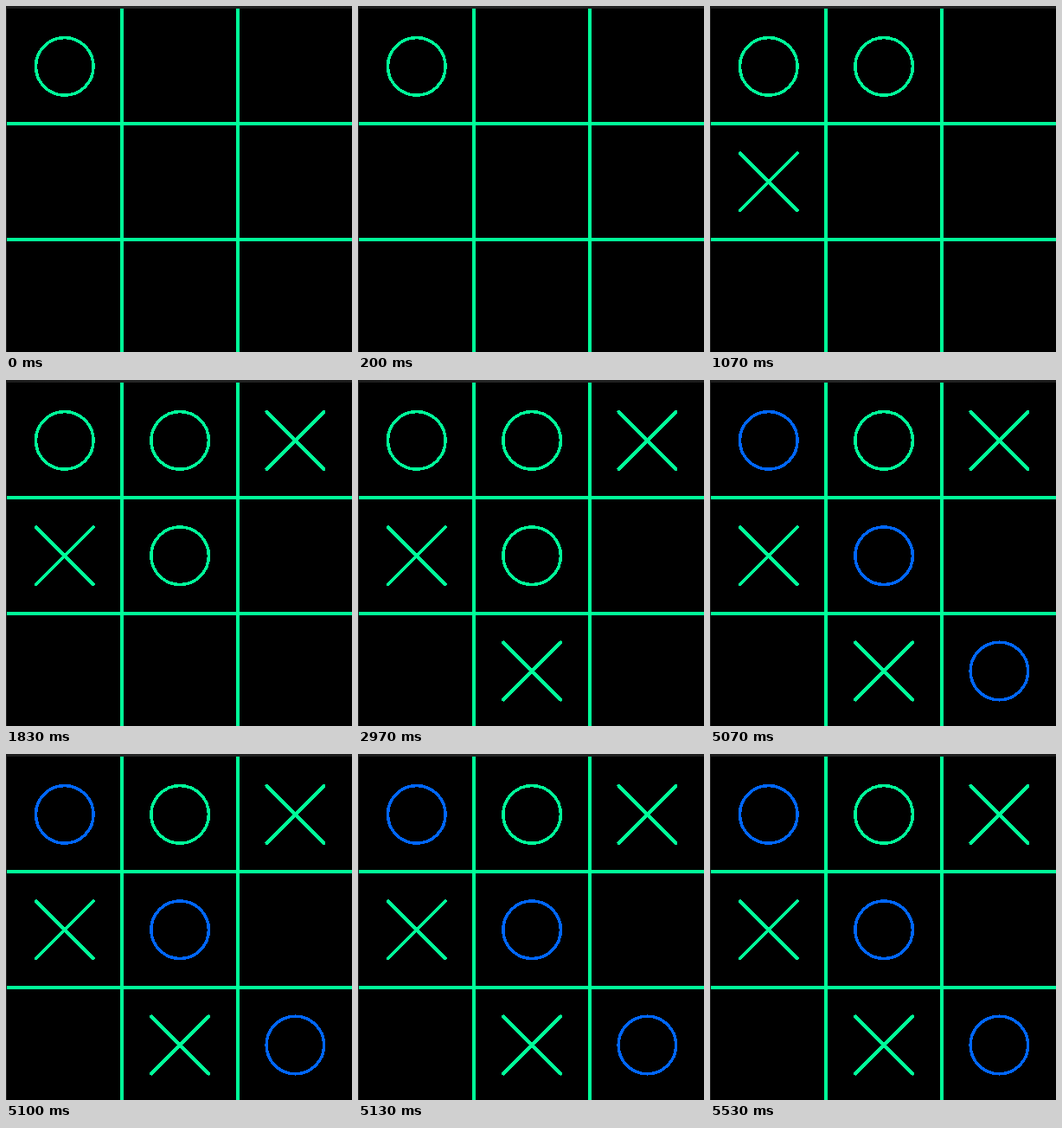
Animation, 400 px wide and 400 px high, one loop 5.61 s. Source, as an HTML page:

```html
<!DOCTYPE html>
<html lang="en">
<head>
<meta charset="utf-8">
<title>Tic-tac-toe</title>
<style>
  html, body { margin: 0; width: 100%; height: 100%; overflow: hidden; background: #000; }
  svg { display: block; width: 100vw; height: 100vh; }
</style>
</head>
<body>
<svg viewBox="0 0 400 400" shape-rendering="crispEdges">
  <defs>
    <linearGradient id="edge">
      <stop offset="0" stop-color="#1c1c1c"/>
      <stop offset=".4" stop-color="#252626"/>
      <stop offset="1" stop-color="#1b1b1b"/>
    </linearGradient>
  </defs>
  <rect width="400" height="400"/>
  <rect width="1" height="400" fill="#222"/>
  <rect width="400" height="3" fill="url(#edge)"/>
  <path d="M134 3V400M268 3V400M1 136H400M1 270H400" stroke="#00ff99" stroke-width="4"/>
  <g id="marks" fill="none" stroke-linecap="round"></g>
</svg>
<script>
const LOOP = 5610, WIN_TIME = 3000;
const GREEN = '#00ff99', BLUE = '#0066ff';
const WINNING = [0, 4, 8];
// [time in ms, cell, mark]
const MOVES = [
  [0, 0, 'O'],
  [970, 3, 'X'], [1070, 1, 'O'],
  [1800, 2, 'X'], [1830, 4, 'O'],
  [2970, 7, 'X'], [3000, 8, 'O']
];
const SHAPES = {
  O: '<circle r="33.3" stroke-width="3.5"/>',
  X: '<path d="M-33-33L33 33M33-33L-33 33" stroke-width="4"/>'
};

const group = document.getElementById('marks');
group.innerHTML = MOVES.map(([, cell, mark]) => {
  const x = 67.8 + 133.3 * (cell % 3);
  const y = 69.9 + 133.3 * Math.floor(cell / 3);
  return `<g transform="translate(${x} ${y})">${SHAPES[mark]}</g>`;
}).join('');

function draw(now) {
  const t = now % LOOP;
  MOVES.forEach(([start, cell], i) => {
    const won = t >= WIN_TIME && WINNING.includes(cell);
    const node = group.children[i];
    node.setAttribute('visibility', t >= start ? 'visible' : 'hidden');
    node.setAttribute('stroke', won ? BLUE : GREEN);
  });
}

const origin = performance.now();
function tick() {
  draw(performance.now() - origin);
  requestAnimationFrame(tick);
}
tick();
</script>
</body>
</html>
```
